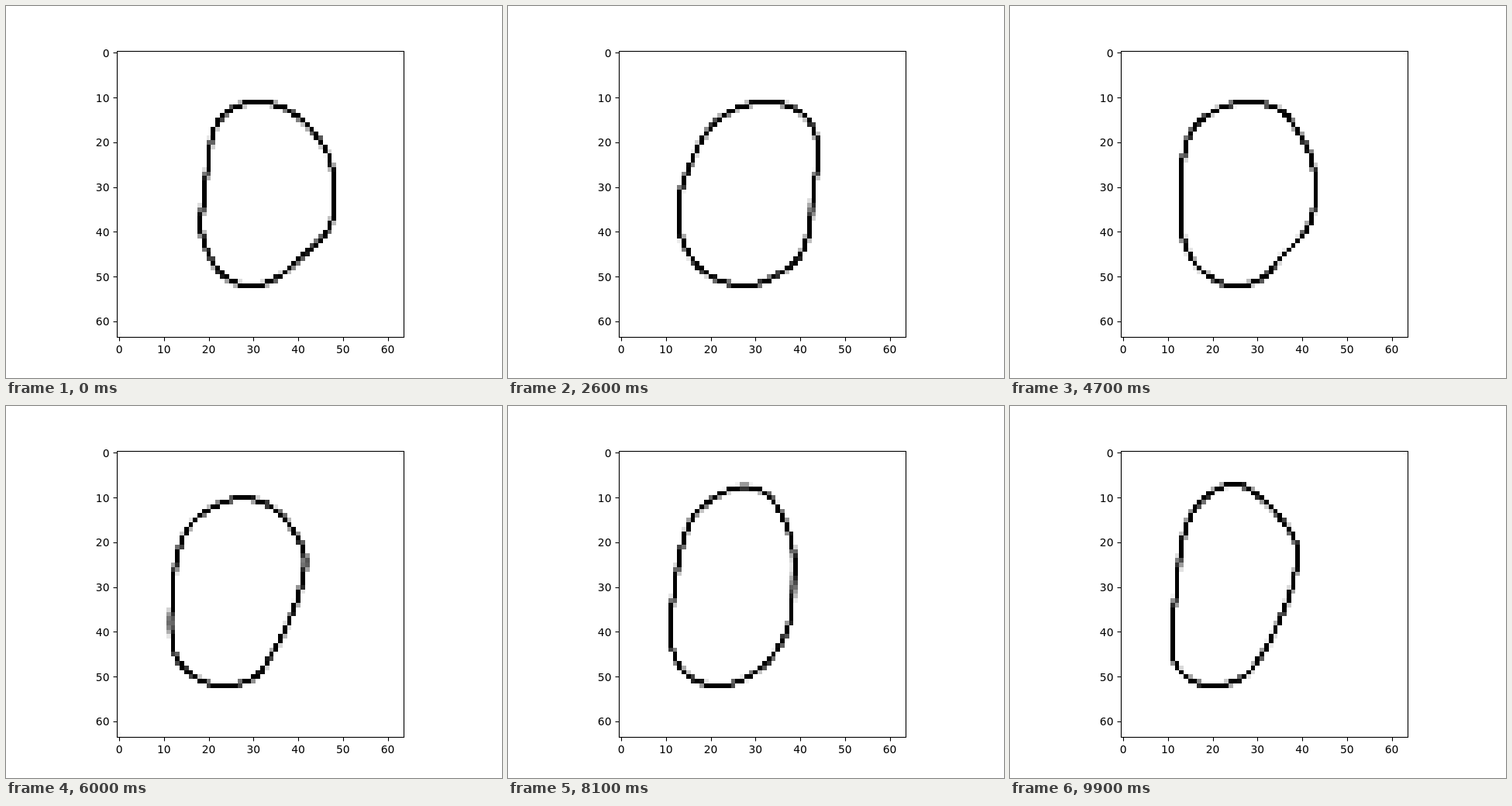
Recreate the animation shown at these times as an HTML page with a canvas. Size 640 by 480 pixels, loop 10000 ms.

```html
<!DOCTYPE html>
<html lang="en">
<head>
<meta charset="utf-8">
<title>Morphing outline</title>
<style>
html, body { margin: 0; width: 100%; height: 100%; overflow: hidden; background: #fff; }
canvas { display: block; }
</style>
</head>
<body>
<canvas id="stage" width="640" height="480"></canvas>
<script>
const ctx = document.getElementById('stage').getContext('2d');
const N = 64, LEFT = 143.2, TOP = 57.6, CELL = 5.775, BOTTOM_ROW = 52;
const STEP_MS = 100, STEPS = 100, POINTS = 16;

// step, top row, then the x of 16 outline points, clockwise from the top
const poses = [
  [0, 11, 31, 37.3, 42.8, 47, 48, 46.8, 40.3, 35, 29.5, 24.2, 20.5, 18.3, 19, 20, 21.3, 25],
  [11, 11, 31.5, 37.5, 43.5, 47.9, 47, 42.7, 38.8, 35.2, 28.5, 21.7, 17.8, 16.4, 17, 18.7, 21, 26],
  [26, 11, 32.5, 39, 43, 43.9, 42.8, 42, 39.5, 33.3, 27.7, 21, 15.8, 13, 13.2, 16, 19.7, 25.5],
  [47, 11, 28, 34.7, 38.7, 42, 43, 41, 35, 31, 25, 20, 15.3, 13, 13, 13.4, 15.6, 21.3],
  [56, 10.8, 27.3, 33.2, 38.3, 42.2, 41, 37, 33, 30.2, 23.3, 17.7, 13, 11.7, 12, 12.7, 15.4, 21.2],
  [73, 8.1, 29, 34.3, 37.9, 39, 38, 38, 35.3, 29, 23, 16.6, 12.4, 11, 12, 13.8, 17, 23.3],
  [89, 7, 26, 30.7, 34, 37.8, 39, 37, 32.2, 26.7, 20.5, 14.7, 11.4, 11, 12, 13, 15.5, 21],
  [99, 7, 25, 29, 34.3, 38.8, 37.8, 34.6, 30.8, 26.5, 20, 14.4, 11, 11, 12, 13, 15.3, 20]
];

function poseAt(step) {
  const i = Math.max(1, poses.findIndex(p => p[0] >= step));
  const a = poses[i - 1], b = poses[i];
  const k = (step - a[0]) / (b[0] - a[0]);
  return a.map((v, j) => v + (b[j] - v) * k).slice(1);
}

// Periodic Catmull-Rom interpolation
function spline(xs, s) {
  const i = Math.floor(s), t = s - i;
  const [a, b, c, d] = [-1, 0, 1, 2].map(o => xs[(i + o + POINTS) % POINTS]);
  return b + t / 2 * (c - a + t * (2 * a - 5 * b + 4 * c - d + t * (3 * (b - c) + d - a)));
}

// Darkness of each cell, by its distance from the outline
function rasterise([top, ...xs]) {
  const grid = new Float32Array(N * N);
  const mid = (top + BOTTOM_ROW) / 2, half = (BOTTOM_ROW - top) / 2;
  for (let s = 0; s < POINTS; s += 1 / 40) {
    const x = spline(xs, s), y = mid - half * Math.cos(s * 2 * Math.PI / POINTS);
    const cx = Math.round(x), cy = Math.round(y);
    for (let r = cy - 1; r <= cy + 1; r++) {
      for (let c = cx - 1; c <= cx + 1; c++) {
        const dark = Math.min(1, (0.7 - Math.hypot(c - x, r - y)) * 3);
        grid[r * N + c] = Math.max(grid[r * N + c], dark);
      }
    }
  }
  grid[N - 1] = grid[(N - 1) * N] = 0.02;
  return grid;
}

const edgeX = c => Math.round(LEFT + c * CELL);
const edgeY = r => Math.round(TOP + r * CELL);

function drawCells(grid) {
  grid.forEach((dark, i) => {
    if (!dark) return;
    const c = i % N, r = (i - c) / N, v = Math.round(255 * (1 - dark));
    ctx.fillStyle = `rgb(${v},${v},${v})`;
    ctx.fillRect(edgeX(c), edgeY(r), edgeX(c + 1) - edgeX(c), edgeY(r + 1) - edgeY(r));
  });
}

function line(x1, y1, x2, y2) {
  ctx.beginPath();
  ctx.moveTo(x1, y1);
  ctx.lineTo(x2, y2);
  ctx.stroke();
}

function drawAxes() {
  ctx.fillStyle = ctx.strokeStyle = '#000';
  ctx.lineWidth = 1.11;
  ctx.font = '13.889px "DejaVu Sans", sans-serif';
  ctx.strokeRect(143.5, 58.5, 370, 369);
  for (let v = 0; v < N; v += 10) {
    const x = LEFT + (v + 0.5) * CELL, y = TOP + (v + 0.5) * CELL;
    const tx = Math.round(x) + 0.5, ty = Math.round(y) + 0.5;
    line(tx, 427.5, tx, 432.5);
    line(138.5, ty, 143.5, ty);
    ctx.textAlign = 'center';
    ctx.fillText(v, x, 448);
    ctx.textAlign = 'right';
    ctx.fillText(v, 133.5, Math.round(y + 5.4));
  }
}

let shown = -1;
const start = performance.now();

function tick() {
  const step = Math.floor((performance.now() - start) / STEP_MS) % STEPS;
  if (step !== shown) {
    shown = step;
    ctx.fillStyle = '#fff';
    ctx.fillRect(0, 0, 640, 480);
    drawCells(rasterise(poseAt(step)));
    drawAxes();
  }
  requestAnimationFrame(tick);
}
tick();
</script>
</body>
</html>
```
